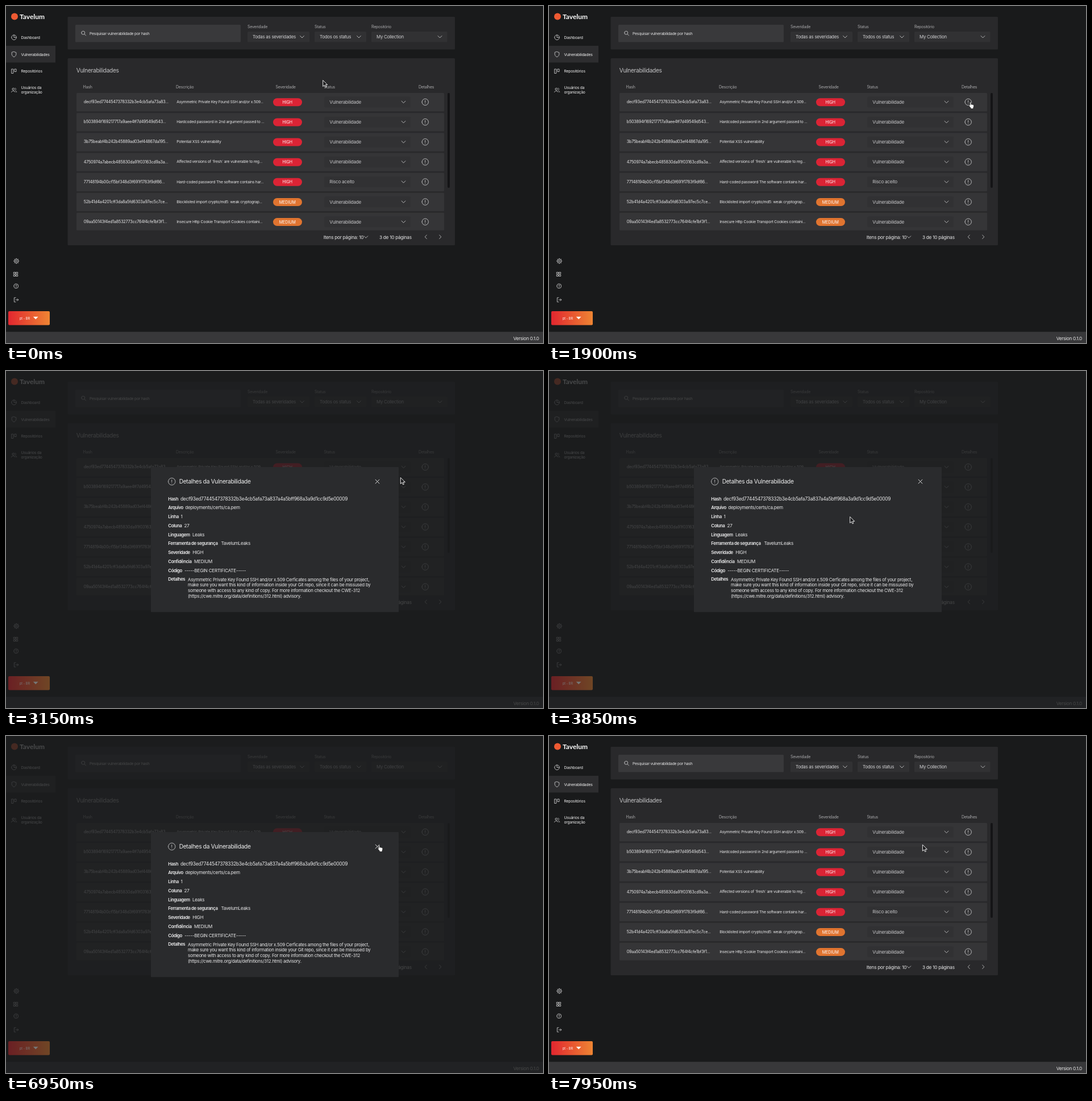
Write an HTML page that moves like this. It is 945 by 593 pixels and loops after 8 s.

```html
<!DOCTYPE html>
<html lang="pt-BR">
<head>
<meta charset="utf-8">
<title>Vulnerabilidades</title>
<style>
  html, body { margin: 0; width: 100%; height: 100%; overflow: hidden; background: #191a1b; }
  svg { display: block; width: 100%; height: 100%; }
  text { font: 8.1px Inter, sans-serif; letter-spacing: -.032em; fill: #e9e9ea; white-space: pre; font-feature-settings: "calt" 0; }
  .brand { font: 700 12px Lato, sans-serif; letter-spacing: 0; fill: #fff; }
  .menu { font-size: 6.8px; fill: #f2f2f2; }
  .title { font-size: 10.2px; fill: #c4c4c6; }
  .label { font-size: 7px; fill: #a9a9ab; }
  .select { font-size: 7.9px; fill: #d2d2d4; }
  .status { font-size: 8.15px; fill: #c6c6c8; }
  .small { font-size: 6.82px; }
  .hash { font-size: 7.23px; }
  .pill { font-size: 7px; letter-spacing: 0; text-anchor: middle; fill: #fff; }
  .pager { font-size: 8.2px; }
  .lang { font-size: 5.5px; letter-spacing: 0; fill: #fff; }
  .name { font-size: 7.9px; font-weight: 600; letter-spacing: -.058em; }
  .long { font-size: 8.4px; }
  .body { font-size: 7.9px; letter-spacing: -.0324em; }
  .heading { font-size: 10.2px; fill: #f0f0f0; }
  .icon { fill: none; stroke: #c4c4c6; stroke-width: .9; stroke-linecap: round; stroke-linejoin: round; }
</style>
</head>
<body>
<svg id="stage" viewBox="0 0 945 593" preserveAspectRatio="none"></svg>
<script>
const svg = document.getElementById('stage');

const text = (x, y, value, cls = '', extra = '') =>
  `<text x="${x}" y="${y}" class="${cls}" ${extra}>${value}</text>`;
const rect = (x, y, w, h, fill, r = 1.5) =>
  `<rect x="${x}" y="${y}" width="${w}" height="${h}" rx="${r}" fill="${fill}"/>`;
const icon = (x, y, d, extra = '') =>
  `<path class="icon" transform="translate(${x} ${y})" d="${d}" ${extra}/>`;
const ring = r => `M${-r} 0a${r} ${r} 0 1 0 ${2 * r} 0a${r} ${r} 0 1 0 ${-2 * r} 0`;
const chevron = (x, y) => icon(x, y, 'M-3.4 -1.7L0 1.7L3.4 -1.7');
const alertIcon = (x, y, r) => icon(x, y, `${ring(r)}M0 -2.9V.6M0 2.6V2.8`);

const PAGE = '#191a1b', PANEL = '#29292b', ROW = '#353537', FIELD = '#313133', SHADE = '#1c1d1e';
const RED = '#db2435', ORANGE = '#e07430';

function sidebar() {
  const gear = Array.from({ length: 8 }, (_, i) => {
    const a = i * Math.PI / 4, c = Math.cos(a), s = Math.sin(a);
    return `M${3.6 * c} ${3.6 * s}L${4.7 * c} ${4.7 * s}`;
  }).join('');
  return rect(0, 70, 87, 29.5, '#2d2d2f', 0)
    + '<circle cx="15" cy="18.5" r="6" fill="#ee5a32"/>'
    + text(24, 22.8, 'Tavelum', 'brand')
    + icon(14, 55.3, `${ring(4.3)}M0 -4.3V0H4.3`)
    + icon(14, 85, 'M0 -4.5L3.8 -3.2V0C3.8 2.2 2 3.8 0 4.7C-2 3.8 -3.8 2.2 -3.8 0V-3.2Z')
    + icon(14, 114.5, 'M-4 -3.5H-1.2V4H-4ZM1.2 -3.5H4V1H1.2Z')
    + icon(14, 148, 'M-3 -1.8a1.8 1.8 0 1 0 3.6 0a1.8 1.8 0 1 0 -3.6 0M-4.6 3.5C-4.4 .7 2 .7 2.2 3.5M2 -3.5C4 -3.2 4 -.4 2.3 0M3 1.2C4 1.5 4.6 2.3 4.6 3.5')
    + text(26.5, 57.8, 'Dashboard', 'menu')
    + text(26.5, 87.5, 'Vulnerabilidades', 'menu')
    + text(26.5, 116.6, 'Repositórios', 'menu')
    + text(26.5, 146, 'Usuários da', 'menu')
    + text(26.5, 154, 'organização', 'menu')
    + icon(18.2, 448.8, ring(3.6) + ring(1.5) + gear)
    + icon(17.2, 472, 'M-3.5 -3.5H-.8V-.8H-3.5ZM.8 -3.5H3.5V-.8H.8ZM-3.5 .8H-.8V3.5H-3.5ZM.8 .8H3.5V3.5H.8Z')
    + icon(17.8, 492.8, `${ring(3.9)}M-1.2 -.9C-1 -2.4 1.3 -2.2 1.2 -.7C1.1 .1 0 .1 0 .9M0 2.1V2.2`)
    + icon(18, 517, 'M-1 -3.8H-3.6V3.8H-1M-1 0H3.8M2 -1.8L3.8 0L2 1.8');
}

function langButton() {
  return '<g id="lang">' + rect(4, 537, 73, 24.5, 'url(#warm)', 2)
    + text(24, 551.6, 'pt - BR', 'lang')
    + '<path d="M47.8 546.8H56.6L52.2 551.3Z" fill="#fff"/></g>';
}

function filters() {
  const select = (x, w, label, value) =>
    text(x, 39.2, label, 'label') + rect(x, 45, w, 18.5, FIELD)
    + text(x + 9, 57.2, value, 'select') + chevron(x + w - 13, 54.3);
  return rect(108.5, 19, 681.5, 57.5, PANEL)
    + rect(122, 33, 291, 30.5, '#39393b')
    + icon(136.5, 48, 'M-3.8 -.8a3 3 0 1 0 6 0a3 3 0 1 0 -6 0M1.4 1.4L4 4')
    + text(147, 50.5, 'Pesquisar vulnerabilidade por hash', 'small')
    + select(425, 109, 'Severidade', 'Todas as severidades')
    + select(543, 91, 'Status', 'Todos os status')
    + select(643, 133.5, 'Repositório', 'My Collection');
}

const findings = [
  ['decf93ed7744547378332b3e4cb5afa73a83...', 'Asymmetric Private Key Found SSH and/or x.509...'],
  ['b503894f169217717a9aee4ff7d49549d543...', 'Hardcoded password in 2nd argument passed to ...'],
  ['3b75beabf4b242b45889ad03ef44867da195...', 'Potential XSS vulnerability'],
  ['4750974a7abecb485830da91f03163cd9a3a...', 'Affected versions of `fresh` are vulnerable to reg...'],
  ['77148194b00cf15bf348d3f691f1783f9df86...', 'Hard-coded password The software contains har...'],
  ['52b41d4a4201cff3da8a5fd6303a97ec5c7ce...', 'Blocklisted import crypto/md5: weak cryptograp...'],
  ['09aa50143f4ed1a8532773cc764f4cfe1bf3f1...', 'Insecure Http Cookie Transport Cookies containi...'],
];

function table() {
  const rows = findings.map(([hash, description], i) => {
    const y = 169 + 35.13 * i, high = i < 5;
    return rect(124, y - 16, 647, i < 6 ? 32.4 : 31, ROW)
      + text(136.8, y + 2.2, hash, 'hash') + text(300.2, y + 2.1, description, 'small')
      + rect(470, y - 6.7, 51, 14, high ? RED : ORANGE, 7)
      + text(495.3, y + 2.9, high ? 'HIGH' : 'MEDIUM', 'pill')
      + rect(560.5, y - 9.5, 151.5, 19, FIELD)
      + text(569.3, y + 2.9, i === 4 ? 'Risco aceito' : 'Vulnerabilidade', 'status')
      + chevron(699.5, y) + alertIcon(737.7, y, 5.7);
  }).join('');
  const heads = [[135.5, 'Hash'], [299, 'Descrição'], [474.5, 'Severidade'], [559.5, 'Status'], [726, 'Detalhes']];
  return rect(108.5, 92, 681.5, 329, PANEL)
    + text(123.7, 117, 'Vulnerabilidades', 'title')
    + heads.map(([x, value]) => text(x, 144.8, value, 'label')).join('')
    + rows + rect(777, 153, 4, 167, '#141416', 2)
    + text(558.7, 409.8, 'Itens por página: 10', 'pager') + chevron(633.3, 406.5)
    + text(657, 409.8, '3 de 10 páginas', 'pager')
    + icon(738.7, 406.3, 'M1.7 -3.2L-1.6 0L1.7 3.2') + icon(764.3, 406.3, 'M-1.7 -3.2L1.6 0L-1.7 3.2');
}

function modal() {
  const fields = [
    ['Hash', 307, 'decf93ed7744547378332b3e4cb5afa73a837a4a5bff968a3a9d1cc9d5e00009'],
    ['Arquivo', 315.2, 'deployments/certs/ca.pem'],
    ['Linha', 307.5, '1'],
    ['Coluna', 313.5, '27'],
    ['Linguagem', 328, 'Leaks'],
    ['Ferramenta de segurança', 378.4, 'TavelumLeaks'],
    ['Severidade', 328.2, 'HIGH'],
    ['Confidência', 331, 'MEDIUM'],
    ['Código', 314.2, '-----BEGIN CERTIFICATE-----'],
    ['Detalhes', 320, ''],
  ];
  const details = [
    'Asymmetric Private Key Found SSH and/or x.509 Cerficates among the files of your project,',
    'make sure you want this kind of information inside your Git repo, since it can be missused by',
    'someone with access to any kind of copy. For more information checkout the CWE-312',
    '(https://cwe.mitre.org/data/definitions/312.html) advisory.',
  ];
  return '<g id="modal">'
    + `<rect width="945" height="593" fill="${SHADE}" opacity=".8"/>`
    + rect(255, 169, 436, 255.2, '#2a2b2d', 1)
    + alertIcon(291.7, 194.5, 6.2)
    + text(304.7, 198.1, 'Detalhes da Vulnerabilidade', 'heading')
    + icon(653.5, 194.5, 'M-3.4 -3.4L3.4 3.4M3.4 -3.4L-3.4 3.4', 'style="stroke:#eee"')
    + fields.map(([name, x, value], i) => {
      const y = 227.7 + 15.75 * i;
      return text(285.3, y, name, 'name') + text(x, y, value, i ? '' : 'long');
    }).join('')
    + details.map((line, i) => text(320, 369.6 + 9.75 * i, line, 'body')).join('')
    + '</g>';
}

const cursor = `<g id="cursor">
  <path id="arrow" d="M0 0V11L2.6 8.7L4.3 12.4L6.1 11.6L4.5 8H8Z" fill="#1c1c1e" stroke="#f4f4f4" stroke-width=".95" stroke-linejoin="round"/>
  <path id="hand" d="M1 1.4C1 -.2 2.7 -.2 2.8 1.4L3 4.6C3.5 3.8 4.6 4 4.8 4.9C5.3 4.2 6.3 4.5 6.4 5.3C7 4.8 8 5.2 8 6.2C8.1 8 7.9 9 7.2 10.2V12H2.6V10.6C1.5 9.4 .4 8 -.5 6.6C-1 5.6 .2 5 1.3 6.3Z" fill="#fff" stroke="#111" stroke-width=".6"/>
</g>`;

svg.innerHTML = `<defs><linearGradient id="warm"><stop stop-color="#e2262f"/><stop offset="1" stop-color="#ee8533"/></linearGradient></defs>`
  + rect(0, 0, 945, 593, PAGE, 0) + sidebar() + filters() + table()
  + rect(0, 573.3, 945, 20, '#38383a', 0)
  + text(938, 587.6, 'Version 0.1.0', 'pager', 'text-anchor="end"')
  + modal() + langButton() + cursor;

// Pointer moves: first step, last step, number of steps, destination, easing
const smooth = p => p * p * (3 - 2 * p);
const easeOut = p => 1 - (1 - p) ** 2;
const linear = p => p;
const start = [557.7, 130.6];
const moves = [
  [600, 900, 4, [615, 135], smooth],
  [1100, 1450, 6, [740.5, 169.5], smooth],
  [1800, 1900, 2, [739.5, 168.7], linear],
  [2950, 3750, 10, [530.2, 255.7], smooth],
  [3850, 3850, 1, [529.7, 256.4], linear],
  [5450, 5450, 1, [530.4, 256.4], linear],
  [5540, 6250, 8, [644.5, 207.5], smooth],
  [6300, 6950, 13, [654.8, 191.6], easeOut],
  [7850, 7950, 2, [657.4, 191.3], linear],
];

function pointerAt(t) {
  let from = start;
  for (const [t0, t1, steps, to, ease] of moves) {
    if (t < t0) break;
    if (t < t1) {
      const done = 1 + Math.floor((t - t0) / (t1 - t0) * (steps - 1) + 1e-6);
      const p = ease(done / steps);
      return from.map((v, i) => v + (to[i] - v) * p);
    }
    from = to;
  }
  return from;
}

const part = id => document.getElementById(id);
const show = (node, on) => node.setAttribute('visibility', on ? 'visible' : 'hidden');
const [modalNode, cursorNode, arrow, hand, lang] = ['modal', 'cursor', 'arrow', 'hand', 'lang'].map(part);

function draw(now) {
  const t = now % 8000;
  const open = t >= 2450 && t < 7400;
  const [x, y] = pointerAt(t);
  const overDetails = !open && Math.hypot(x - 737.7, y - 169) < 7;
  const overClose = open && Math.abs(x - 653.5) < 5 && Math.abs(y - 194.5) < 5;
  show(modalNode, open);
  lang.setAttribute('opacity', open ? .4 : 1);
  show(hand, overDetails || overClose);
  show(arrow, !(overDetails || overClose));
  cursorNode.setAttribute('transform', `translate(${x} ${y})`);
  requestAnimationFrame(draw);
}
requestAnimationFrame(draw);
</script>
</body>
</html>
```
